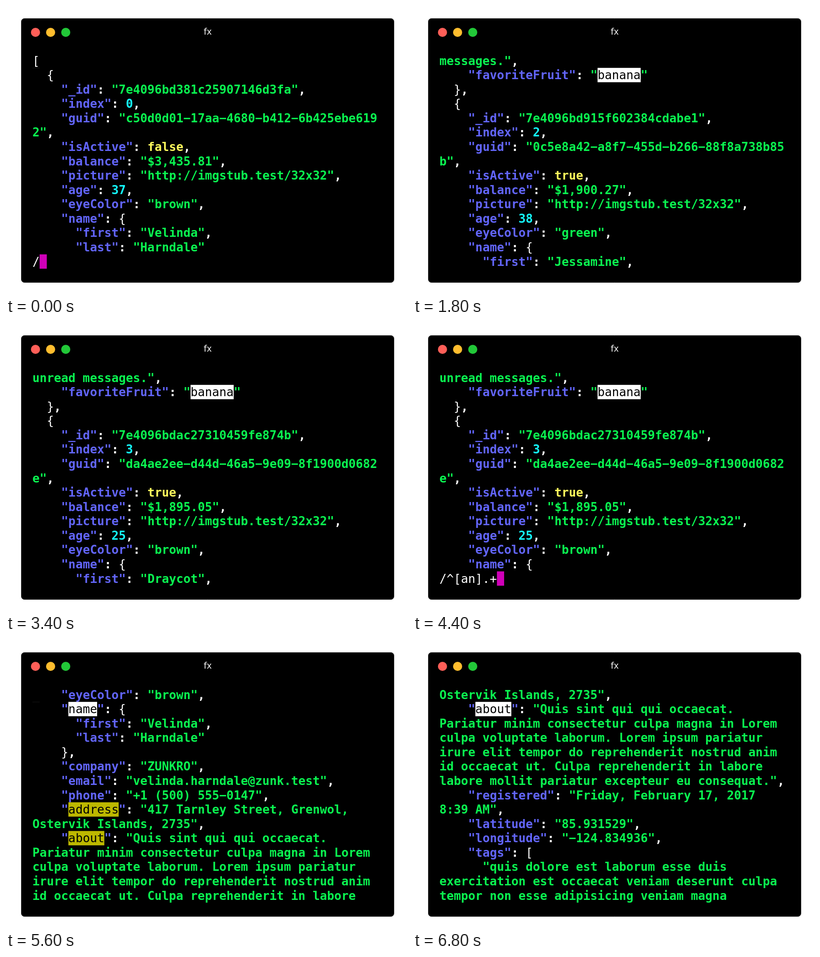
Recreate the animation shown at these times as an HTML page with a canvas. Size 880 px wide and 636 px high, loop 7 s.

```html
<!DOCTYPE html>
<html lang="en">
<head>
<meta charset="utf-8">
<title>fx</title>
<style>
  html, body { margin: 0; width: 100%; height: 100%; overflow: hidden; background: #fff; }
  canvas { display: block; }
</style>
</head>
<body>
<canvas id="stage" width="880" height="636"></canvas>
<script>
const ctx = document.getElementById('stage').getContext('2d');
const LOOP = 7000, STEP = 200, ROWS = 15;
const LEFT = 58, TOP = 104.6, CELL = 15.774, LINE = 31.57, BASE = 25;
const MONO = '26.2px "DejaVu Sans Mono", monospace';
const COLORS = { key: '#6265fa', str: '#0af550', num: '#14faff', bool: '#fffa5c', brace: '#fff', mark: '#fff' };
const TOKENS = /(?<key>"\w+"(?=:))|(?<str>"[^"]*"?|^\w[^"]*"?)|(?<num>\d+)|(?<bool>true|false)|(?<brace>[[{}\]])|(?<mark>[:,])/g;

const scheme = 'http:';
const record = (id, index, guid, active, balance, age, eyes, first) => `  {
    "_id": "7e4096bd${id}",
    "index": ${index},
    "guid": "${guid.slice(0, 35)}
${guid.slice(35)}",
    "isActive": ${active},
    "balance": "$${balance}",
    "picture": "${scheme}//imgstub.test/32x32",
    "age": ${age},
    "eyeColor": "${eyes}",
    "name": {
      "first": "${first}",`;

const start = `[
${record('381c25907146d3fa', 0, 'c50d0d01-17aa-4680-b412-6b425ebe6192', false, '3,435.81', 37, 'brown', 'Velinda')}
      "last": "Harndale"
    },
    "company": "ZUNKRO",
    "email": "velinda.harndale@zunk.test",
    "phone": "+1 (500) 555-0147",
    "address": "417 Tarnley Street, Grenwol,
Ostervik Islands, 2735",
    "about": "Quis sint qui qui occaecat.
Pariatur minim consectetur culpa magna in Lorem
culpa voluptate laborum. Lorem ipsum pariatur
irure elit tempor do reprehenderit nostrud anim
id occaecat ut. Culpa reprehenderit in labore
labore mollit pariatur excepteur eu consequat.",
    "registered": "Friday, February 17, 2017
8:39 AM",
    "latitude": "85.931529",
    "longitude": "-124.834936",
    "tags": [
      "quis dolore est laborum esse duis
exercitation est occaecat veniam deserunt culpa
tempor non esse adipisicing veniam magna`.split('\n');

const fruitHit = (tail, next) => `${tail} messages.",
    "favoriteFruit": "banana"
  },
${next}`.trim().split('\n');

const second = fruitHit('', record('915f602384cdabe1', 2, '0c5e8a42-a8f7-455d-b266-88f8a738b85b', true, '1,900.27', 38, 'green', 'Jessamine'));
const third = fruitHit('unread', record('ac27310459fe874b', 3, 'da4ae2ee-d44d-46a5-9e09-8f1900d0682e', true, '1,895.05', 25, 'brown', 'Draycot'));

const fruit = /"(banana)"/, names = /"([an]\w+)"/;
const view = (time, lines, scroll, pattern, prompt) => ({ time, lines, scroll, pattern, prompt });
const typing = (time, lines, pattern, prompts) =>
  prompts.map((prompt, i) => view(time + i * STEP, lines, 0, pattern, prompt));

const timeline = [
  ...typing(0, start, null, ['/', '/b', '/ban', '/bana', '/banana']),
  view(1200, second, 0, fruit),
  view(2600, third, 0, fruit),
  ...typing(3600, third, fruit, ['/', '/^', '/^[a', '/^[an]', '/^[an].+']),
  view(4800, start, 8, names),
  view(5600, start, 10, names),
  view(6000, start, 17, names),
  view(6600, start, 19, names),
];

function cells(col, row, count, color) {
  ctx.fillStyle = color;
  ctx.fillRect(LEFT + col * CELL, TOP + row * LINE, count * CELL, LINE);
}

function write(text, col, row, color, bold) {
  ctx.font = (bold ? 'bold ' : '') + MONO;
  ctx.fillStyle = color;
  ctx.fillText(text.replaceAll('-', '\u2212'), LEFT + col * CELL, TOP + row * LINE + BASE);
}

function drawLine(line, row, pattern) {
  const hit = pattern && line.match(pattern);
  for (const { 0: text, index, groups } of line.matchAll(TOKENS)) {
    const kind = Object.keys(groups).find(name => groups[name]);
    const marked = hit && index === hit.index;
    const shown = marked ? '"' + ' '.repeat(hit[1].length) + '"' : text;
    write(shown, index, row, COLORS[kind], kind !== 'brace');
    if (marked) {
      cells(index + 1, row, hit[1].length, row === 1 ? '#fff' : '#bdb800');
      write(hit[1], index + 1, row, '#000');
    }
  }
}

function drawWindow() {
  ctx.fillStyle = '#fff';
  ctx.fillRect(0, 0, 880, 636);
  ctx.beginPath();
  ctx.roundRect(33.5, 27.5, 818, 581, 7);
  ctx.fillStyle = '#000';
  ctx.fill();
  ctx.strokeStyle = '#3a3a3a';
  ctx.stroke();
  ['#ff5f58', '#ffbd2e', '#22c838'].forEach((color, i) => {
    ctx.beginPath();
    ctx.arc(64.7 + i * 33.2, 58, 10, 0, Math.PI * 2);
    ctx.fillStyle = color;
    ctx.fill();
  });
  ctx.font = '20px "Noto Sans", sans-serif';
  ctx.fillStyle = '#f4f4f4';
  ctx.textAlign = 'center';
  ctx.fillText('fx', 442.5, 63);
  ctx.textAlign = 'left';
}

function draw(now) {
  const time = now % LOOP;
  const { lines, scroll, pattern, prompt } = timeline.findLast(v => v.time <= time);
  drawWindow();
  const visible = lines.slice(scroll, scroll + (prompt ? ROWS - 1 : ROWS));
  if (!/^\w/.test(visible[0])) {
    ctx.fillStyle = '#161616';
    ctx.fillRect(LEFT, 136, CELL, 1);
  }
  visible.forEach((line, row) => drawLine(line, row, pattern));
  if (prompt) {
    write(prompt, 0, ROWS - 1, '#fff');
    cells(prompt.length, ROWS - 1, 1, '#d000b8');
  }
  requestAnimationFrame(() => draw(performance.now()));
}
draw(0);
</script>
</body>
</html>
```
